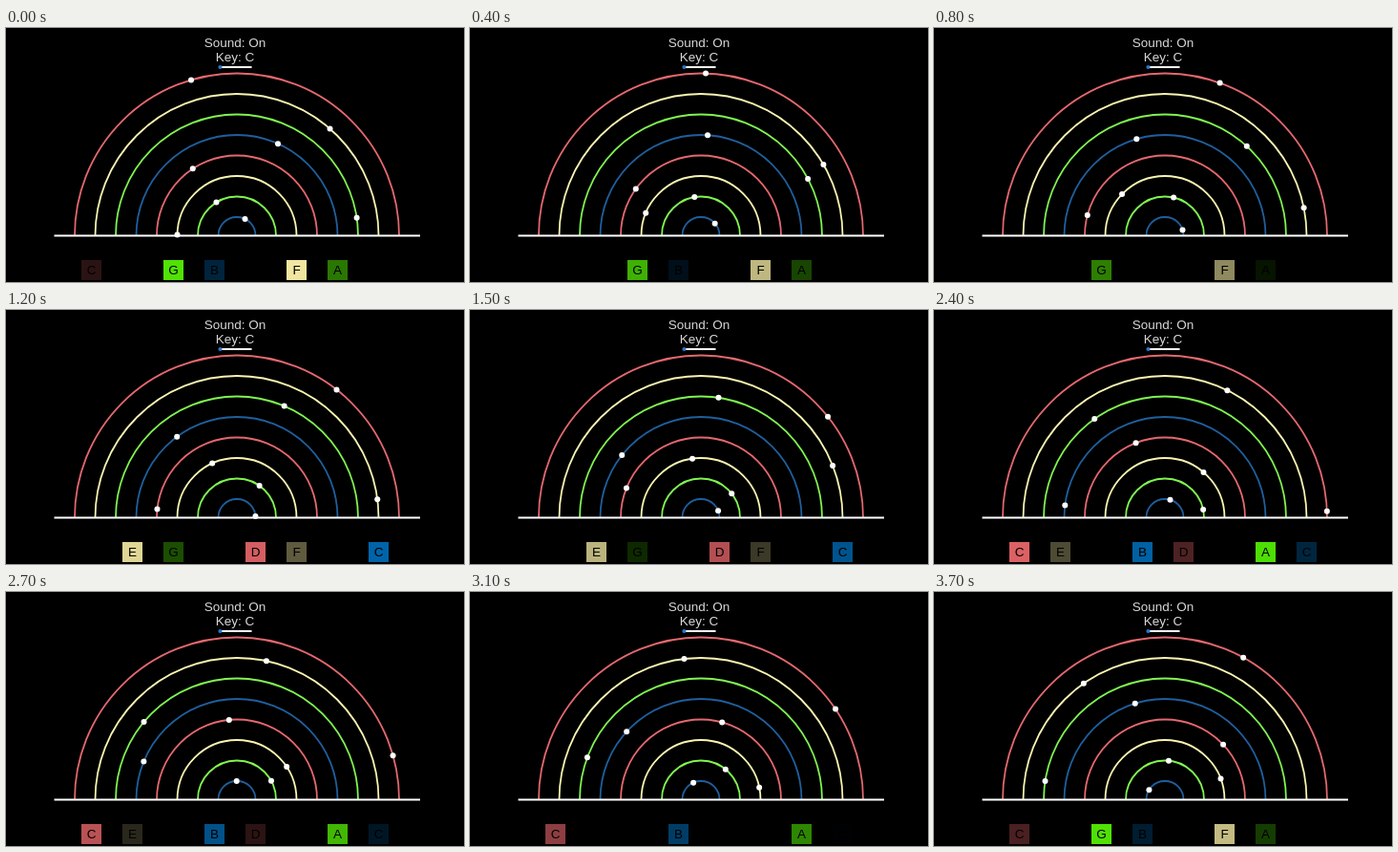
An HTML page with a canvas that plays this animation: 480 by 266 pixels, repeating every 3.8 s.

```html
<!DOCTYPE html>
<html>
<head>
<meta charset="utf-8">
<style>
  html, body { margin: 0; width: 100%; height: 100%; overflow: hidden; background: #000; }
  canvas { display: block; }
</style>
</head>
<body>
<canvas id="stage" width="480" height="266"></canvas>
<script>
const ctx = document.getElementById('stage').getContext('2d');
const LOOP = 3800, STEP = 100, FADE = 2;
const CX = 242, CY = 217.5;
const notes = 'CEGBDFAC';
const arcColors = ['#e4686e', '#f8f4b0', '#80f550', '#1f5f9c'];
const keyColors = ['#e26468', '#f2e8a2', '#58f805', '#0069b0'];

function line(x1, x2, y, color, width) {
  ctx.strokeStyle = color;
  ctx.lineWidth = width;
  ctx.beginPath();
  ctx.moveTo(x1, y);
  ctx.lineTo(x2, y);
  ctx.stroke();
}

function dot(x, y, r, color) {
  ctx.fillStyle = color;
  ctx.beginPath();
  ctx.arc(x, y, r, 0, 2 * Math.PI);
  ctx.fill();
}

function text(str, x, y, size, color) {
  ctx.font = size + 'px "Liberation Sans", Arial, sans-serif';
  ctx.textAlign = 'center';
  ctx.fillStyle = color;
  ctx.fillText(str, x, y);
}

const radius = i => 170 - 21.5 * i;
const mod = (a, n) => ((a % n) + n) % n;

// Each ball swings between 0 and 180 degrees; inner ones are faster.
function ball(i, t) {
  const speed = 45.27 + 1.74 * i;
  const phase = -106.4 + 57.45 * i + speed * t;
  const swing = mod(phase, 360);
  const angle = Math.min(swing, 360 - swing) * Math.PI / 180;
  return {
    x: CX + radius(i) * Math.cos(angle),
    y: CY - radius(i) * Math.sin(angle),
    sinceHit: mod(phase, 180) / speed
  };
}

function draw(t) {
  ctx.fillStyle = '#000';
  ctx.fillRect(0, 0, 480, 266);

  text('Sound: On', 240, 20, 13.5, '#d8d8d8');
  text('Key: C', 240, 35, 13.5, '#d8d8d8');
  line(225, 257.5, 41, '#fff', 2);
  dot(224.5, 41, 2.1, '#2a78d0');

  for (let i = 0; i < 8; i++) {
    ctx.strokeStyle = arcColors[i % 4];
    ctx.lineWidth = 1.8;
    ctx.beginPath();
    ctx.arc(CX, CY, radius(i), Math.PI, 0);
    ctx.stroke();
  }
  line(50.5, 434, 217.5, '#fff', 1.8);

  for (let i = 0; i < 8; i++) {
    const b = ball(i, t);
    dot(b.x, b.y, 3, '#fff');

    const x = 79 + 43 * i;
    ctx.globalAlpha = Math.max(0, 1 - b.sinceHit / FADE);
    ctx.fillStyle = keyColors[i % 4];
    ctx.fillRect(x, 243, 21, 21);
    ctx.globalAlpha = 1;
    text(notes[i], x + 10.5, 258, 13.5, '#000');
  }
}

const start = performance.now();
function tick() {
  const ms = (performance.now() - start) % LOOP;
  draw(Math.floor(ms / STEP) * STEP / 1000);
  requestAnimationFrame(tick);
}
tick();
</script>
</body>
</html>
```
